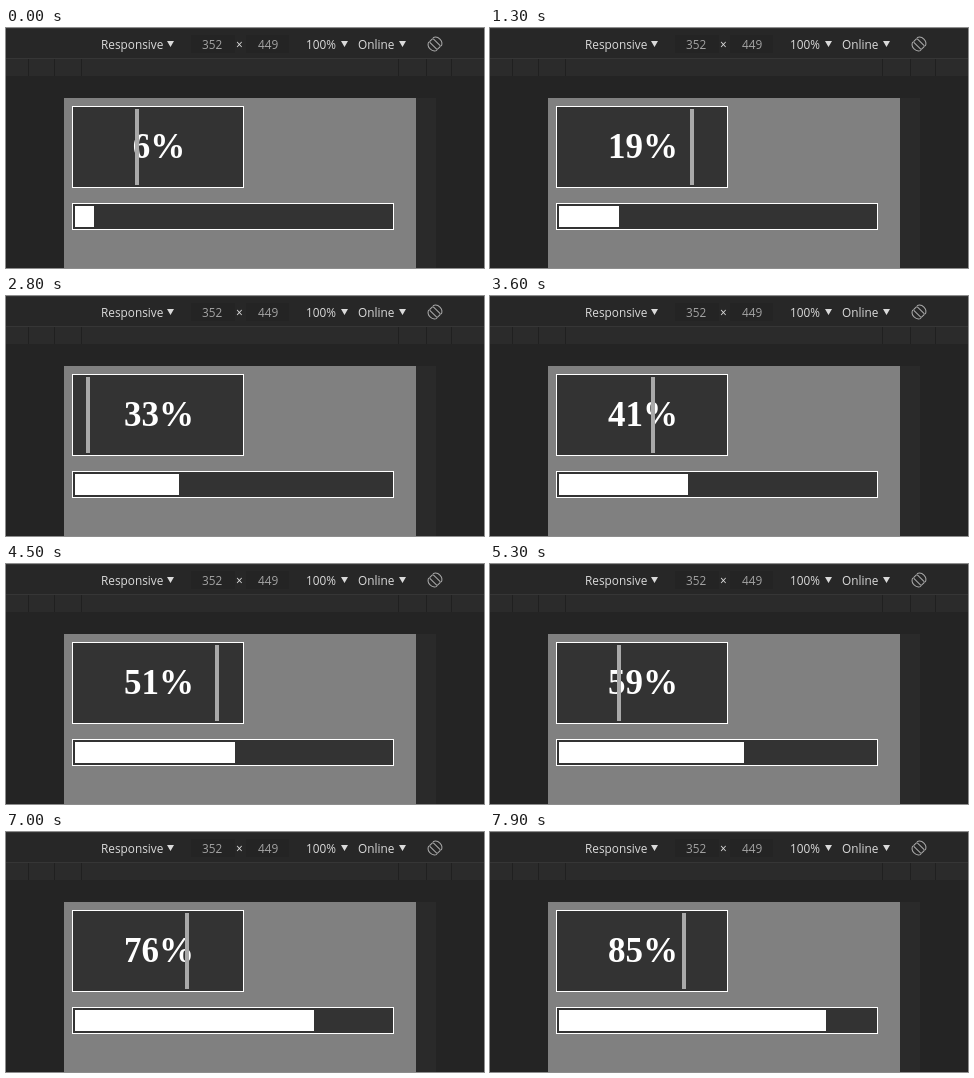
Animation, 478 px wide and 240 px high, one loop 8 s. Source, as an HTML page:

```html
<!DOCTYPE html>
<html lang="en">
<head>
<meta charset="utf-8">
<title>Loading progress</title>
<style>
  html, body { margin: 0; width: 100%; height: 100%; overflow: hidden; background: #242424; }
  svg { display: block; }
  .ui { font: 11.8px "Open Sans", "Noto Sans", sans-serif; fill: #dadada; }
  .dim { fill: #a3a3a3; }
  #label { font: bold 35px "Liberation Serif", "Times New Roman", serif; fill: #fff; text-anchor: middle; }
  .frame { fill: #333; stroke: #fff; }
</style>
</head>
<body>
<svg width="478" height="240" viewBox="0 0 478 240">
  <!-- toolbar -->
  <rect width="478" height="30" fill="#272727"/>
  <rect width="478" height="1" fill="#333"/>
  <path d="M185 7h44v18h-44zM240 7h43v18h-43z" fill="#242424"/>
  <g class="ui">
    <text x="95" y="21">Responsive</text>
    <text class="dim" x="196" y="21">352</text>
    <text x="230" y="21">×</text>
    <text class="dim" x="252" y="21">449</text>
    <text x="300" y="21">100%</text>
    <text x="352" y="21">Online</text>
    <path d="M161 13h7l-3.5 6zM335 13h7l-3.5 6zM393 13h7l-3.5 6z"/>
  </g>
  <g transform="translate(429 16) rotate(-45)" fill="none" stroke="#aaa">
    <rect x="-2.5" y="-5.5" width="5" height="11" rx="1"/>
    <path d="M-3 -6A6.5 6.5 0 0 0 -3 6M3 -6A6.5 6.5 0 0 1 3 6"/>
  </g>
  <!-- ruler strip and page -->
  <rect y="30" width="478" height="18" fill="#2b2b2b"/>
  <rect y="30" width="478" height="1" fill="#363636"/>
  <path d="M22.5 31v17M48.5 31v17M75.5 31v17M392.5 31v17M420.5 31v17M445.5 31v17" stroke="#202020"/>
  <rect x="410" y="70" width="20" height="170" fill="#2a2a2a"/>
  <rect x="58" y="70" width="352" height="170" fill="#808080"/>

  <rect class="frame" x="66.5" y="78.5" width="171" height="81"/>
  <text id="label" x="153" y="130"></text>
  <rect id="slider" y="81" width="4" height="76" fill="#a9a9a9"/>
  <rect class="frame" x="66.5" y="175.5" width="321" height="26"/>
  <rect id="fill" x="69" y="178" height="21" fill="#fff"/>
</svg>
<script>
  const LOOP = 8000, STEP = 100;
  const LEFT = 69, RANGE = 162, START = 60;
  const FULL = 314.3;

  // Slightly uneven timer: [ms, pixels travelled by the slider]
  const pace = [
    [0, 0], [900, 92], [1000, 104], [1300, 133], [2100, 207.6], [2700, 265],
    [3600, 356], [4200, 421], [4300, 431], [4500, 448], [5400, 540],
    [5900, 589], [6000, 598], [6300, 631], [7200, 717], [7900, 789]
  ];

  const $ = id => document.getElementById(id);
  const label = $("label"), slider = $("slider"), fill = $("fill");

  function travelled(t) {
    const i = pace.findIndex(p => p[0] >= t);
    if (i <= 0) return 0;
    const [t0, d0] = pace[i - 1], [t1, d1] = pace[i];
    return d0 + (d1 - d0) * (t - t0) / (t1 - t0);
  }

  function draw(now) {
    const t = Math.floor(now % LOOP / STEP) * STEP;
    const d = travelled(t);
    const percent = Math.floor(6.22 + d / 10);
    const phase = (START + d) % (2 * RANGE);
    slider.setAttribute("x", Math.round(LEFT + RANGE - Math.abs(RANGE - phase)));
    fill.setAttribute("width", Math.round(FULL * percent / 100));
    label.textContent = percent + "%";
  }

  const begin = performance.now();
  function tick() {
    draw(performance.now() - begin);
    requestAnimationFrame(tick);
  }
  tick();
</script>
</body>
</html>
```
